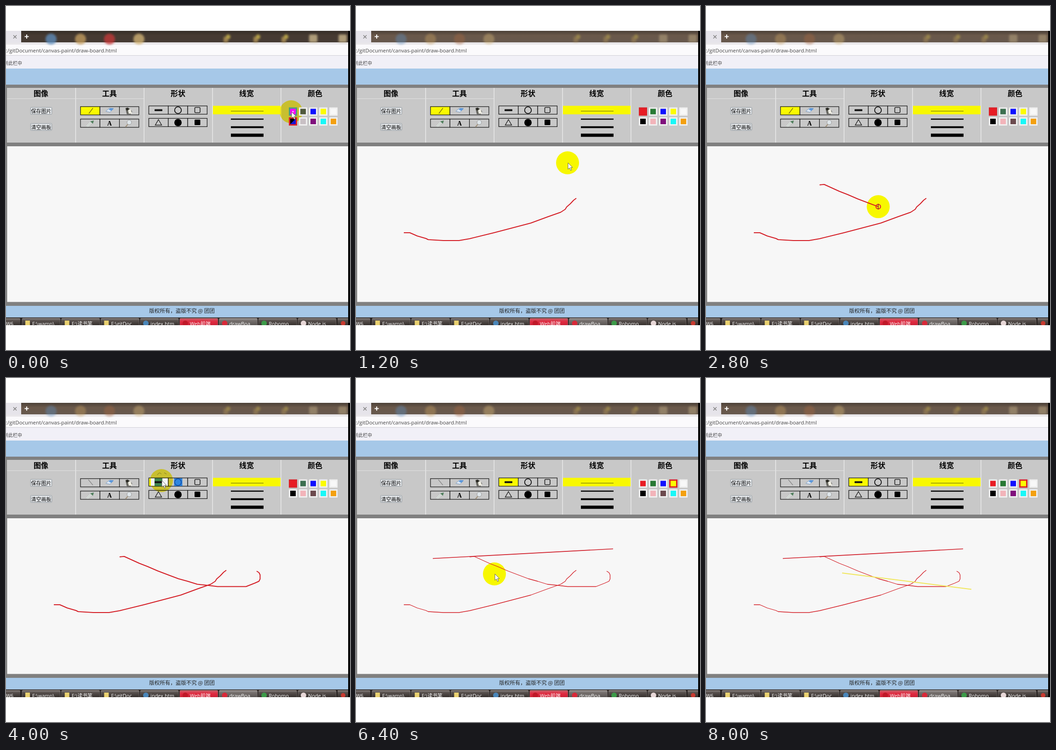
Animation of 748x748 px, one loop 9.2 s. Source, as an HTML page:

```html
<!DOCTYPE html>
<html lang="zh">
<head>
<meta charset="utf-8">
<title>Drawing board</title>
<style>
html, body { margin: 0; width: 100%; height: 100%; overflow: hidden; background: #fff; }
svg { display: block; width: 748px; height: 748px; font-family: "Noto Sans CJK SC", "Noto Sans CJK", sans-serif; }
.halo { mix-blend-mode: multiply; }
</style>
</head>
<body>
<svg id="stage" viewBox="0 0 748 748">
  <defs>
    <linearGradient id="strip" x2="0" y2="1">
      <stop offset="0" stop-color="#4b4037"/><stop offset=".4" stop-color="#6a584a"/><stop offset="1" stop-color="#66584d"/>
    </linearGradient>
    <linearGradient id="task" x2="0" y2="1">
      <stop offset="0" stop-color="#8b8582"/><stop offset=".25" stop-color="#5a5350"/><stop offset="1" stop-color="#2b2523"/>
    </linearGradient>
    <linearGradient id="taskRed" x2="0" y2="1">
      <stop offset="0" stop-color="#c8606a"/><stop offset=".4" stop-color="#e02a40"/><stop offset="1" stop-color="#c41f34"/>
    </linearGradient>
    <filter id="soft"><feGaussianBlur stdDeviation="2"/></filter>
    <clipPath id="screen"><rect y="54" width="744" height="640"/></clipPath>
    <clipPath id="barClip"><rect x="450" y="217" width="147" height="18.5"/></clipPath>
  </defs>
  <g clip-path="url(#screen)">
    <g id="page"></g>
    <g id="live"></g>
  </g>
  <rect x="744" y="54" width="4" height="640" fill="#000"/>
</svg>
<script>
const STEP = 400, LOOP = 9200, LAST = 20;
const page = document.getElementById('page');
const live = document.getElementById('live');

const rect = (x, y, w, h, fill, more = '') =>
  `<rect x="${x}" y="${y}" width="${w}" height="${h}" fill="${fill}" ${more}/>`;
const circle = (x, y, r, fill, more = '') =>
  `<circle cx="${x}" cy="${y}" r="${r}" fill="${fill}" ${more}/>`;
const path = (d, stroke, width = 1, fill = 'none', more = '') =>
  `<path d="${d}" fill="${fill}" stroke="${stroke}" stroke-width="${width}" ${more}/>`;
const text = (s, x, y, size, more = '') =>
  `<text x="${x}" y="${y}" font-size="${size}" ${more}>${s}</text>`;
const mid = 'text-anchor="middle"';

const CURVE_A = [[104, 493], [117, 493], [124, 496], [133, 500], [152, 505.5], [157, 508], [190, 510],
  [224, 510], [247, 506], [300, 493], [380, 472], [418, 458], [445, 448.5], [455, 442], [458, 437],
  [466, 430], [473, 422.5], [479, 418]];
const CURVE_B = [[247, 389], [257, 388], [290, 403], [308, 410], [330, 419.5], [355, 429], [375, 436.5],
  [395, 442], [416, 448.5], [440, 451], [460, 453.5], [522, 453.5], [541, 446], [550, 442], [552.5, 437],
  [552.5, 428], [550, 423], [545, 420]];
const LINE_C = [[167, 392.5], [559, 371.5]];
const LINE_D = [[296, 424], [577, 459.5]];

// Leading part of a polyline, by share of its length
function part(pts, share) {
  const len = i => Math.hypot(pts[i][0] - pts[i - 1][0], pts[i][1] - pts[i - 1][1]);
  let left = 0;
  for (let i = 1; i < pts.length; i++) left += len(i);
  left *= share;
  const out = [pts[0]];
  for (let i = 1; i < pts.length && left > 0; i++) {
    const k = Math.min(1, left / len(i));
    out.push(pts[i].map((v, a) => pts[i - 1][a] + (v - pts[i - 1][a]) * k));
    left -= len(i);
  }
  return out;
}

// Each stroke: points, colour, first step, and share drawn at that and later steps
const strokes = [
  { pts: CURVE_A, color: '#d41c24', from: 1, grow: [.12, .72, 1] },
  { pts: CURVE_B, color: '#d41c24', from: 7, grow: [.4, 1] },
  { pts: LINE_C, color: '#d01c28', from: 11, grow: [.02, .6, .992] },
  { pts: LINE_D, color: '#f0e65a', from: 17, grow: [.35, .75, 1] }
];
// Free pointer positions by step
const spots = {
  0: [620, 230], 3: [460, 341], 4: [560, 280], 5: [604, 233], 6: [400, 315], 9: [430, 310],
  10: [338, 223], 14: [650, 290], 15: [690, 230], 16: [301, 426]
};

function drawChrome() {
  let s = rect(0, 54, 744, 25, 'url(#strip)');
  s += rect(0, 79, 744, 5, '#e9e7ea') + rect(0, 84, 744, 23, '#fbfafc') + rect(0, 107, 744, 1, '#cfced6');
  s += rect(0, 108, 744, 28, '#f1f0f7') + rect(0, 136, 744, 35, '#a6c8e8');
  s += text(':/gitDocument/canvas-paint/draw-board.html', 0, 100.5, 11.4,
    'fill="#444" font-family="Open Sans, sans-serif"');
  s += text('到此栏中', 35, 128, 10, 'fill="#444" text-anchor="end"');
  return s;
}

function drawPanels() {
  const titles = ['图像', '工具', '形状', '线宽', '颜色'];
  let s = rect(0, 171, 744, 481, '#808080') + rect(2, 178, 742, 119, '#c8c8c8');
  titles.forEach((t, i) => {
    s += text(t, 76 + i * 149, 196, 16, mid + ' font-weight="bold"');
    if (i) s += rect(2 + i * 148.8, 178, 1.3, 119, '#efefef');
  });
  s += rect(2, 201, 298, 1, '#e2e2e2');
  ['保存图片', '清空画板'].forEach((t, i) => {
    const y = 220.5 + i * 35;
    s += rect(53.5, y, 46, 15, '#e8ebee', 'stroke="#8a9298" rx="1"');
    s += text(t, 76.5, y + 12, 11, mid);
  });
  [[246, 2.5], [263.5, 4], [281, 7]].forEach(([y, w]) => s += rect(489, y - w / 2, 71, w, '#000'));
  s += rect(2.5, 305, 741.5, 338.5, '#f7f7f7');
  s += rect(0, 652, 744, 26, '#a6c8e8');
  s += text('版权所有，盗版不究 @ 团团', 382.5, 667, 11.5, mid + ' fill="#222"');
  return s;
}

function drawTaskbar() {
  let s = rect(0, 677, 744, 17, '#262120') + rect(0, 677, 744, 1.2, '#4c4a4c');
  const tabs = [['F:\\wamp\\', '#e8d070'], ['F:\\读书笔', '#e8d070'], ['F:\\gitDoc', '#e8d070'],
    ['index.htm', '#4a86b8'], ['Web前端', '#c01828'], ['drawBoa', '#d82838'],
    ['Robomo', '#3c9a48'], ['Node.js', '#e8d8d8']];
  s += rect(-4, 679, 35, 18, 'url(#task)', 'rx="2"') + text('W6', 0, 695, 11, 'fill="#fff"');
  tabs.forEach(([name, color], i) => {
    const x = 35 + i * 85.7;
    s += rect(x, 679, 83, 18, i === 4 ? 'url(#taskRed)' : 'url(#task)', 'rx="2" stroke="#8d8784" stroke-width=".6"');
    if (i === 5) s += rect(x, 679, 83, 18, '#fff', 'rx="2" opacity=".18"');
    s += i < 3 ? rect(x + 7, 684, 10, 11, color) : circle(x + 12, 690, 6, color);
    s += text(name, x + 22, 695, 11, 'fill="#fff" font-family="Open Sans, Noto Sans CJK SC, sans-serif"');
  });
  return s + rect(721, 679, 30, 18, 'url(#task)') + circle(733, 690, 5, '#c83a30');
}

function drawStrip(step) {
  const first = step === 0;
  const marks = [[98, '#5f8fc0'], [162, '#c8a060'], [225, first ? '#c83838' : '#a86840'], [289, '#d8b878']];
  let s = first ? rect(0, 54, 744, 25, '#1c1814', 'opacity=".45"') : '';
  let g = '';
  marks.forEach(([x, c]) => g += circle(x, 72, 12, c));
  [480, 545, 606].forEach(x => g += rect(x - 7, 67, 10, 12, '#b89858') + circle(x + 3, 67, 5, '#d8c050'));
  [668, 732].forEach(x => g += rect(x - 9, 62, 18, 17, '#d0bc90', 'rx="3"'));
  s += `<g filter="url(#soft)" opacity="${first ? .75 : .4}">${g}</g>`;
  s += rect(0, 54, 33, 26, '#e6e4ea');
  return s + path('M16 63.5l7 7m0-7l-7 7', '#777', 1.2) + path('M40.5 66.5h9m-4.5-4.5v9', '#fff', 2);
}

function cells(x, y, on) {
  let s = '';
  for (let i = 0; i < 6; i++) {
    s += rect(x + i % 3 * 42.3, y + (i > 2 ? 27 : 0), 42.3, 18, i === on ? '#fafa00' : '#c8c8c8',
      'stroke="#111" stroke-width="1.2"');
  }
  return s;
}

function drawTools(lineTool) {
  let s = cells(162, 218.8, lineTool ? -1 : 0) + cells(310.5, 217.3, lineTool ? 0 : -1);
  // Pencil, eraser, bucket
  s += lineTool ? path('M179 221l10 12', '#888', 1.3) : path('M180 234l9-12', '#7a6a10', 1.3);
  s += path('M217 229l8-7 9 1-8 8z', '#5a80b0', .7, '#dce8f4') + path('M223 225l4-3 7 1-5 5z', 'none', 0, '#5c98dc');
  s += path('M260 222l8 1 6 6-3 6h-8z', '#444', .6, '#6a6a62') + path('M265 226l6-2 3 10h-7z', 'none', 0, '#f0eee4');
  s += circle(264, 224, 3, '#2a2a24');
  // Dropper, letter, magnifier
  s += path('M176 262l10-10', '#eef4f0', 3) + path('M176 262l10-10', '#7a8a80', .8) + path('M183 251l6 5 2-7z', 'none', 0, '#4f7f5c');
  s += text('A', 225, 259.5, 14, mid + ' font-weight="bold" font-family="Liberation Serif, serif"');
  s += path('M265 257l-5 6', '#a09078', 2) + circle(268, 253, 5, '#dfe6ea', 'stroke="#999"');
  // Line width choice
  return s + rect(450, 217, 147, 18.5, '#f8f800') + rect(489, 228, 71, 1.1, '#6a6a10');
}

// Shape icons, with the selection tint left by a click
function drawShapes(picking) {
  let s = '';
  if (picking) {
    s += rect(315, 218, 37, 16.5, '#f4f4f4') + rect(323, 218, 17, 17, '#3f8450');
    s += rect(365.5, 218, 18, 17, '#2f86e0') + path('M329 211q4-8 9-2m6-3l5 3', '#7a7420', 1);
  }
  s += rect(323, 224.5, 17, 4, '#111', 'rx="1"');
  s += circle(374, 226.5, 7.3, 'none', `stroke="${picking ? '#1450a8' : '#111'}" stroke-width="1.8"`);
  s += rect(410.5, 220.5, 11.5, 11.5, 'none', 'rx="2" stroke="#222" stroke-width="1.6"');
  return s + path('M331.5 247l7 12h-14z', '#222', 1.4) + circle(374, 253.5, 8, '#000') +
    rect(410, 247, 12.5, 12, '#000', 'rx="1.5"');
}

function drawColors(step) {
  const early = step === 0, hover = early || step === 5;
  const brown = step >= 5 && step <= 10 || step >= 15 && step <= 17;
  const green = early ? '#505a3c' : step >= 5 && step <= 10 ? '#3c7050' : '#287a34';
  const fills = [hover ? '#ff00ff' : '#e81c24', green, '#1010ff', '#fcfc00', '#f8f8f8',
    '#000', early ? '#c8c0c4' : '#f2b4ba', brown ? '#6c4a4e' : '#80107c', '#18f8f8', '#f4a010'];
  const chosen = early ? 5 : step < 15 ? 0 : 3;
  return fills.map((c, i) => {
    const x = 624 + i % 5 * 22, y = i < 5 ? 229.5 : 251;
    const border = i === chosen ? '#dc2028' : early && i === 0 ? '#4a9a84' : '#f0f0f0';
    let s = rect(x - 9, y - 9, 18, 18, border) + rect(x - 6, y - 6, 12, 12, c);
    if (hover && i === 0) s += circle(x, y, 1.6, '#ffd8ff');
    if (hover && i === 5) s += path(`M${x - 6} ${y + 6}h12v-12z`, 'none', 0, '#1414d8');
    return s;
  }).join('');
}

function drawHalo([x, y]) {
  return circle(x, y, 25, y < 300 ? '#fff43c' : '#ffff00', 'class="halo"');
}

function drawPointer([x, y], pressed) {
  if (pressed) {
    return circle(x, y, 5, 'none', 'stroke="#e01c30" stroke-width="2"') + path(`M${x} ${y - 6}v12`, '#7a3020', 1.4);
  }
  return path(`M${x + 1} ${y}v14l3.3-3 2.4 5.5 2.3-1-2.4-5.3h4.3z`, '#555', .9, '#fff');
}

function render(step) {
  let pointer = spots[step], pressed = false, ink = '';
  for (const k of strokes) {
    const age = step - k.from;
    if (age < 0) continue;
    const active = age < k.grow.length && !spots[step];
    const pts = part(k.pts, active ? k.grow[age] : 1);
    const width = k.pts === LINE_D ? 2 : step < 11 ? 2 : k.pts === LINE_C ? 1.6 : 1.3;
    ink += path('M' + pts.map(p => p.join(' ')).join('L'), k.color, width, 'none', 'stroke-linejoin="round"');
    if (active) {
      pointer = pts[pts.length - 1];
      pressed = true;
    }
  }
  let s = drawStrip(step) + drawTools(step >= 10);
  if (pointer) s += drawHalo(pointer);
  if (step === 5) s += circle(...pointer, 25, '#f8f8f8', 'clip-path="url(#barClip)"');
  s += drawShapes(step === 10) + drawColors(step) + ink;
  if (pointer) s += drawPointer(pointer, pressed);
  live.innerHTML = s;
}

page.innerHTML = drawChrome() + drawPanels() + drawTaskbar();
const start = performance.now();
let shown = -1;
function tick() {
  const t = (performance.now() - start) % LOOP;
  const step = Math.min(LAST, Math.floor(t / STEP));
  if (step !== shown) render(shown = step);
  requestAnimationFrame(tick);
}
tick();
</script>
</body>
</html>
```
